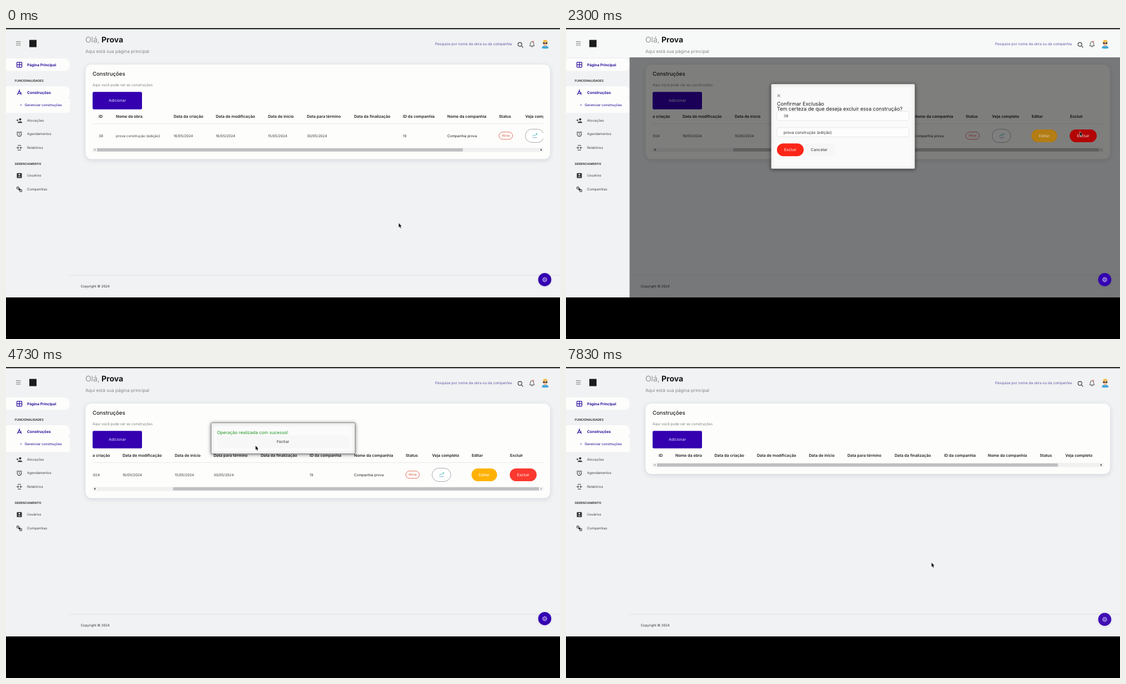
Animation, 998 px wide and 561 px high, one loop 7890 ms. Source, as an HTML page with a canvas:

```html
<!DOCTYPE html>
<html lang="pt-BR">
<head>
<meta charset="utf-8">
<title>Construções</title>
<style>
html, body { margin: 0; width: 100%; height: 100%; overflow: hidden; background: #000; }
canvas { display: block; width: 998px; height: 561px; }
</style>
</head>
<body>
<canvas id="stage"></canvas>
<script>
const W = 998, H = 561, LOOP = 7890;
const canvas = document.getElementById('stage');
const dpr = window.devicePixelRatio || 1;
canvas.width = W * dpr;
canvas.height = H * dpr;
const c = canvas.getContext('2d');
c.textRendering = 'geometricPrecision';

const BG = '#f0f2f3', CARD = '#fdfdfc', INK = '#1c1c1c', BRAND = '#3400b0', NAVY = '#2c0f9c';

// Times of the hard changes, in ms
const OPEN = 2270, DONE = 4130, HOVER = 5330, CLOSE = 6080, RELOAD = 6300, RISE = 7030;
const SCROLL = [1150, 1620, 168];

// Pointer path: time, x, y
const PATH = [
  [0, 707.5, 352], [150, 707.5, 352], [900, 703.5, 179], [1600, 703.5, 179], [2080, 925.7, 187],
  [2350, 925.7, 187], [2920, 414, 219], [4200, 414, 219], [4680, 449.6, 142],
  [4900, 449.6, 142], [5500, 476.5, 130], [6090, 476.5, 130], [6380, 507.5, 188],
  [6690, 507.5, 188], [6840, 585, 292], [7020, 585, 292], [7760, 658.5, 353], [LOOP, 658.5, 353]
];

const HEADS = ['ID', 'Nome da obra', 'Data da criação', 'Data de modificação', 'Data de inicio',
  'Data para término', 'Data da finalização', 'ID da companhia', 'Nome da companhia', 'Status',
  'Veja completo', 'Editar', 'Excluir'];
const COLS = [167, 198, 302, 378, 472, 542, 627, 715, 795, 888, 935.5, 1007, 1076];
const EMPTY_COLS = [167, 197, 267.5, 344, 437.5, 507, 592, 681, 760, 853.5, 899.5];
const ROW = ['38', 'prova construção (edição)', '16/05/2024', '16/05/2024', '15/05/2024',
  '30/05/2024', '', '19', 'Companhia prova'];

const clamp = v => Math.max(0, Math.min(1, v));
const ease = p => p * p * (3 - 2 * p);

function text(s, x, y, size, color = INK, weight = 400, align = 'left') {
  c.font = `${weight} ${size}px Inter, "Open Sans", sans-serif`;
  c.fillStyle = color;
  c.textAlign = align;
  c.fillText(s, x, y);
}

function rect(x, y, w, h, color) {
  c.fillStyle = color;
  c.fillRect(x, y, w, h);
}

function box(x, y, w, h, r, fill, stroke, lw = 0.8) {
  c.beginPath();
  c.roundRect(x, y, w, h, r);
  if (fill) { c.fillStyle = fill; c.fill(); }
  if (stroke) { c.strokeStyle = stroke; c.lineWidth = lw; c.stroke(); }
}

function disc(x, y, r, fill, stroke, lw = 1) {
  c.beginPath();
  c.arc(x, y, r, 0, 7);
  if (fill) { c.fillStyle = fill; c.fill(); }
  if (stroke) { c.strokeStyle = stroke; c.lineWidth = lw; c.stroke(); }
}

function path(d, x, y, stroke, lw = 1, fill) {
  const p = new Path2D(d);
  c.save();
  c.translate(x, y);
  if (stroke) { c.strokeStyle = stroke; c.lineWidth = lw; c.stroke(p); }
  if (fill) { c.fillStyle = fill; c.fill(p); }
  c.restore();
}

function shadowed(color, blur, dy, draw) {
  c.save();
  c.shadowColor = color;
  c.shadowBlur = blur * dpr;
  c.shadowOffsetY = dy * dpr;
  draw();
  c.restore();
}

function sidebar() {
  path('M0 0H8.5M0 3.2H8.5M0 6.4H8.5', 18, 24.5, '#6b6b66', 0.9);
  rect(42, 21.5, 13, 13, '#1c1c1c');

  box(-12, 55, 127, 22.5, 10, CARD);
  box(-12, 105, 127, 23, 10, CARD);
  rect(0, 127, 115, 26, CARD);

  box(19.6, 61.8, 9, 9, 0.8, null, NAVY, 1.2);
  path('M0 -4.5V4.5M-4.5 0H4.5', 24.1, 66.3, NAVY, 1.2);
  text('Página Principal', 38, 68.7, 6.65, NAVY, 700);

  text('FUNCIONALIDADES', 15.7, 96.5, 5.43, '#2a2a2a', 600);
  path('M-3.6 4.6L0 -3L3.6 4.6M-2 1Q1 3.4 4 .6M0 -5V-2.6', 24, 116, NAVY, 1.2);
  text('Construções', 38, 118.6, 6.8, NAVY, 700);
  disc(27, 139, 1.2, '#8b80c4');
  text('Gerenciar construções', 33.7, 141, 6.15, '#3a22a0', 500);

  const item = (s, y) => text(s, 38, y + 2.2, 6.14, '#444');
  item('Alocações', 166.8);
  disc(25.5, 164.8, 2.1, '#333');
  path('M-2.8 4.2V3Q1.5 .2 5.2 3V4.2Z', 24, 167, null, 1, '#333');
  path('M-5.2 0H-1.6M-3.4 -1.8V1.8', 24, 166.4, '#333', 1);
  item('Agendamentos', 191);
  disc(24, 191.6, 3.8, null, '#333', 1.1);
  path('M0 -2V.5L1.8 1.5M-5 -2.6L-2.6 -4.7M5 -2.6L2.6 -4.7', 24, 191.3, '#333', 0.9);
  item('Relatórios', 215.8);
  path('M-5.2 0H-2M2 0H5.2M-3 -2L-1 0L-3 2M3 -2L1 0L3 2M-3 -4.2H3M-3 4.2H3', 24, 216, '#333', 1);

  text('GERENCIAMENTO', 15.7, 246.7, 5.43, '#2a2a2a', 600);
  item('Usuários', 265.8);
  box(19.5, 261.7, 9, 9, 1, '#333');
  disc(24, 264.7, 1.4, BG);
  path('M-2.7 3Q0 .4 2.7 3Z', 24, 266, null, 1, BG);
  item('Companhias', 290.4);
  box(19.7, 286.8, 3.4, 3.4, 0.4, null, '#333', 1.1);
  box(22.6, 289.4, 3.4, 3.4, 0.4, '#333');
  box(25, 291.8, 3.4, 3.4, 0.4, null, '#333', 1.1);
}

function avatar(x, y) {
  path('M-6.3 7.4Q-5 2.6 0 2.8Q5 2.6 6.3 7.4Q0 9 -6.3 7.4Z', x, y, null, 1, '#3fa8dc');
  rect(x - 1.4, y + 1, 2.8, 3.4, '#e9ae86');
  c.beginPath();
  c.ellipse(x, y - 1.4, 3.9, 4.6, 0, 0, 7);
  c.fillStyle = '#f4c29a';
  c.fill();
  path('M-4.2 -2Q-4.6 -7.2 0 -7.4Q4.8 -7 4.2 -2Q3 -4.6 0 -4.4Q-3 -4.6 -4.2 -2Z', x, y, null, 1, '#f2b632');
  box(x - 4, y - 2.8, 3.6, 2.4, 0.9, '#26262c');
  box(x + 0.4, y - 2.8, 3.6, 2.4, 0.9, '#26262c');
}

function header() {
  text('Olá,', 143, 26.3, 14, '#777', 300);
  text('Prova', 172, 26.3, 14, '#151515', 700);
  text('Aqui está sua página principal', 143, 44.8, 8.1, '#868686');
  text('Pesquise por nome da obra ou da companhia', 773, 31.2, 6.46, '#5f53a8');
  disc(925.8, 29.6, 3.5, null, '#333', 1.1);
  path('M0 0L3.2 3.2', 928.3, 32.1, '#333', 1.2);
  path('M-4.2 3.3Q-3 2 -3 -1Q-2.6 -4.3 0 -4.3Q2.6 -4.3 3 -1Q3 2 4.2 3.3ZM-1.2 5H1.2', 947.6, 29, '#333', 0.9);
  disc(949.6, 24.5, 1.3, '#e8695f');
  avatar(971.3, 29);
}

function pill(label, x, y, w, h, fill, color) {
  box(x, y, w, h, h / 2, fill);
  text(label, x + w / 2, y + h / 2 + 2.5, 7, color, 400, 'center');
}

function scrollbar(y, x, w, atStart) {
  rect(156, y, 812, 7.4, '#f0f0f1');
  rect(x, y + 0.8, w, 5.8, '#bfbfc2');
  path('M1 -2L-1.4 0L1 2Z', 160, y + 3.7, null, 1, atStart ? '#999' : '#333');
  path('M-1 -2L1.4 0L-1 2Z', 964, y + 3.7, null, 1, atStart ? '#333' : '#aaa');
}

function row(sx, hover) {
  ROW.forEach((s, i) => text(s, COLS[i] - sx, 197, 6.4, i === 8 ? INK : '#3c3c3c'));
  box(888.2 - sx, 187.7, 24.4, 13.2, 6.6, CARD, '#e0604f', 0.9);
  text('Ativa', 900.4 - sx, 196.4, 6, '#df5a48', 400, 'center');
  box(935.6 - sx, 182.5, 33.6, 24, 12, '#fff', '#85858c', 0.7);
  path('M-4 2L-1.4 -.6L.4 .8L4 -2.8M1.8 -2.8H4V-.8', 952.6 - sx, 193.4, '#35b8b4', 0.9);
  path('M-4 4H4', 952.6 - sx, 193.8, '#6f9bd8', 0.9);
  pill('Editar', 1006.6 - sx, 183, 46, 23, '#ffb203', '#fff');
  pill('Excluir', 1075.5 - sx, 183, 48.4, 23, hover ? '#fd6b61' : '#fb3930', hover ? INK : '#fff');
}

function card(t) {
  const empty = t >= RELOAD;
  const sx = empty ? 0 : SCROLL[2] * ease(clamp((t - SCROLL[0]) / (SCROLL[1] - SCROLL[0])));
  shadowed('rgba(90,100,130,.2)', 9, 2, () => box(143.5, 66, 836.5, empty ? 127 : 170.5, 10, CARD));
  text('Construções', 156, 86.2, 9.6, INK, 500);
  text('Aqui você pode ver as construções', 156, 105, 6.47, '#7b827e');
  box(156, 115.2, 89, 31.5, 2.5, BRAND);
  text('Adicionar', 200.5, 133.4, 6.95, '#e8e2ff', 400, 'center');

  c.save();
  c.beginPath();
  c.rect(156, 148, 812, 66);
  c.clip();
  (empty ? EMPTY_COLS : COLS).forEach((x, i) => text(HEADS[i], x - sx, 162, 7.1, INK, 600));
  if (!empty) {
    rect(156, 172.2, 812, 0.8, '#e2e4e4');
    row(sx, t >= 2030 && t < OPEN);
  }
  c.restore();
  if (empty) scrollbar(173.1, 164, 722, true);
  else scrollbar(216.1, 164 + sx * 137 / 168, 659, sx < 1);
}

function confirmBox() {
  rect(114.5, 53, W - 114.5, 433, 'rgba(0,0,0,.5)');
  pill('Editar', 838.6, 183, 46, 23, '#b37d14', '#ddd0b0');
  pill('Excluir', 907.5, 183, 48.4, 23, '#b30505', '#f5dcdc');
  shadowed('rgba(0,0,0,.55)', 6, 1, () => box(369.5, 101, 259, 153, 2, '#fafafa', '#777', 0.6));
  path('M-2.3 -2.3L2.3 2.3M2.3 -2.3L-2.3 2.3', 383.3, 122, '#8a8a8a', 1.1);
  box(380, 150.3, 238, 16.5, 2, '#fdfdfd', '#dcdde2', 0.7);
  box(380, 179.8, 238, 16.5, 2, '#fdfdfd', '#dcdde2', 0.7);
  text('Confirmar Exclusão', 380, 139.6, 9.2, INK);
  text('Tem certeza de que deseja excluir essa construção?', 380, 148.8, 9.13, INK);
  text('38', 392, 161.3, 6.9, '#333');
  text('prova construção (edição)', 392, 190.6, 6.97, '#333');
  pill('Excluir', 380, 208.2, 48.2, 23, '#fb2618', '#fff');
  box(428.5, 208.2, 56, 23, 11.5, '#f6f6f7');
  text('Cancelar', 441, 222.2, 7.1, '#333');
}

function successBox(hover) {
  shadowed('rgba(0,0,0,.5)', 6, 1, () => box(369.5, 100.6, 259.5, 56, 2, '#fbfbfb', '#6f6f6f', 0.8));
  text('Operação realizada com sucesso!', 380, 120.8, 8, '#1f9622');
  box(380, 123.2, 238.5, 23, 3, hover ? '#d2d2d2' : '#f7f7f8');
  text('Fechar', 499, 137, 6.9, hover ? '#c2c2c2' : '#333', 400, 'center');
}

function gear(t) {
  if (t >= RELOAD && t < RISE) return;
  const p = t < RELOAD ? 1 : clamp((t - RISE) / 860);
  c.save();
  c.globalAlpha = p;
  c.beginPath();
  c.rect(940, 400, 58, 86);
  c.clip();
  c.translate(970.5, 453.9 + 20 * (1 - p));
  shadowed('rgba(52,0,176,.12)', 4, 1, () => disc(0, 0, 11.8, BRAND));
  c.rotate(t / 2000 * Math.PI * 2);
  disc(0, 0, 3, null, '#d8ceff', 0.8);
  disc(0, 0, 1.2, null, '#d8ceff', 0.7);
  for (let i = 0; i < 8; i++) {
    rect(-0.7, -4.5, 1.4, 1.5, '#d8ceff');
    c.rotate(Math.PI / 4);
  }
  c.restore();
}

function pointer(t) {
  let i = 1;
  while (i < PATH.length - 1 && PATH[i][0] < t) i++;
  const [t0, x0, y0] = PATH[i - 1], [t1, x1, y1] = PATH[i];
  const p = ease(clamp((t - t0) / (t1 - t0)));
  const x = x0 + (x1 - x0) * p, y = y0 + (y1 - y0) * p;
  const hand = t > OPEN && t < DONE && x > 380 && x < 428 && y > 208 && y < 231;
  if (hand) {
    path('M-.8 .6Q0 -.6 .8 .6V3.4L4 4.2Q5 4.6 4.7 6L4 9.6H-.6L-3.2 6Q-3 4.8 -1.6 5.6L-.8 6.2Z', x, y, '#111', 1.6, '#fff');
  } else {
    path('M0 0V7.6L1.7 6.1L2.9 8.9L4.1 8.3L2.9 5.6H5.2Z', x, y, '#fff', 0.9, '#111');
  }
}

function draw(t) {
  c.setTransform(dpr, 0, 0, dpr, 0, 0);
  rect(0, 0, W, H, '#000');
  rect(0, 0, W, 486, BG);
  const modal = t >= OPEN && t < DONE;
  if (modal) rect(0, 0, W, 53, '#f7f8f8');
  rect(0, 0, W, 2.3, '#30302d');
  sidebar();
  header();
  rect(114.5, 445.6, W - 114.5, 0.8, '#d9dce0');
  text('Copyright © 2024', 134.7, 468.2, 6.05, '#333');
  card(t);
  if (modal) confirmBox();
  if (t >= DONE && t < CLOSE) successBox(t >= HOVER);
  gear(t);
  pointer(t);
}

const start = performance.now();
function tick() {
  draw((performance.now() - start) % LOOP);
  requestAnimationFrame(tick);
}
tick();
</script>
</body>
</html>
```
